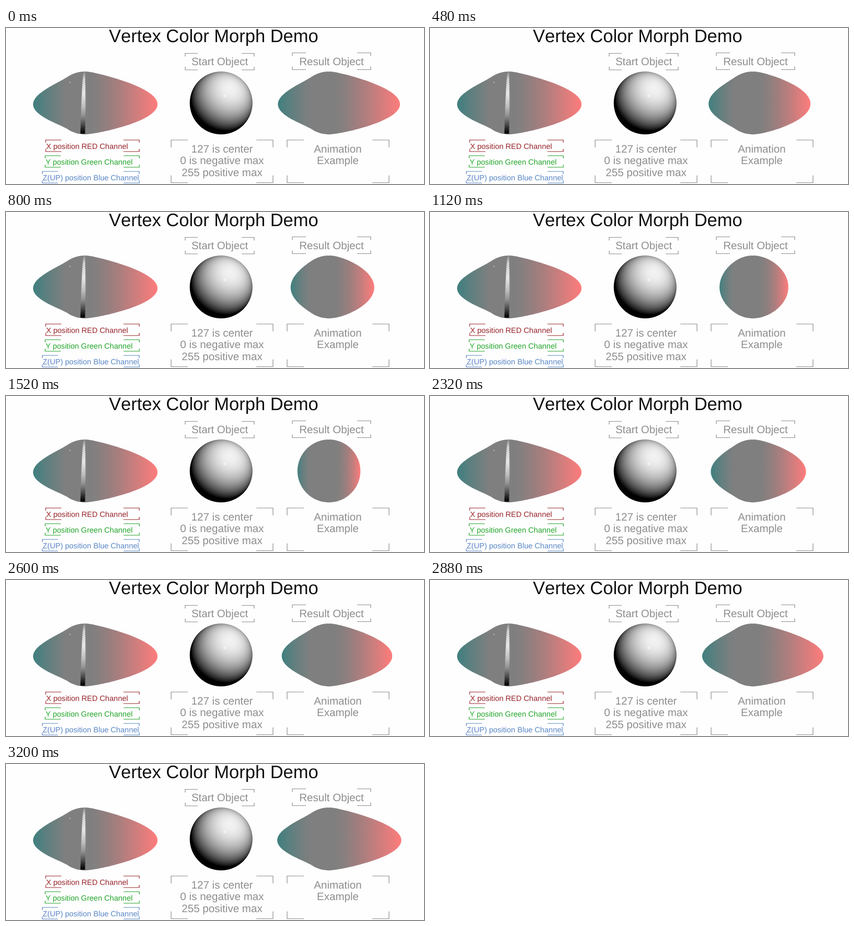
These frames come from a looping animation (800 by 298 pixels, 3.24 s). An HTML page with a canvas:

```html
<!DOCTYPE html>
<html lang="en">
<head>
<meta charset="utf-8">
<title>Vertex Color Morph Demo</title>
<style>
  html, body { margin: 0; width: 100%; height: 100%; overflow: hidden; background: #fefefe; }
  canvas { position: absolute; left: 350px; top: 82px; }
  svg { position: absolute; left: 0; top: 0; }
  text {
    font-family: "Liberation Sans", Arial, sans-serif;
    font-kerning: none;
    text-rendering: geometricPrecision;
  }
</style>
</head>
<body>
<canvas id="ball" width="124" height="124"></canvas>
<svg id="stage" width="800" height="298" viewBox="0 0 800 298">
  <defs>
    <linearGradient id="stripShade" gradientUnits="userSpaceOnUse" x1="0" y1="83" x2="0" y2="203">
      <stop offset="0" stop-color="#8c8c8c"/>
      <stop offset=".12" stop-color="#cfcfcf"/>
      <stop offset=".35" stop-color="#e6e6e6"/>
      <stop offset=".55" stop-color="#c0c0c0"/>
      <stop offset=".7" stop-color="#929292"/>
      <stop offset=".85" stop-color="#484848"/>
      <stop offset=".96" stop-color="#0a0a0a"/>
    </linearGradient>
  </defs>
</svg>
<script>
const NS = "http://www.w3.org/2000/svg";
const stage = document.getElementById("stage");
const RADIUS = 60, CENTER_Y = 143.2;
const LOOP = 3240, STEP = 40, SWING = 3333;
const GREY = "#8e8e8e";

function add(parent, tag, attrs, content) {
  const el = document.createElementNS(NS, tag);
  for (const key in attrs) el.setAttribute(key, attrs[key]);
  if (content) el.textContent = content;
  parent.appendChild(el);
  return el;
}

function label(content, x, y, size, fill, anchor = "middle") {
  add(stage, "text", { x, y, fill, "font-size": size, "text-anchor": anchor }, content);
}

function brackets(x0, y0, x1, y1, armX, armY, stroke) {
  const corner = (x, y, sx, sy) => `M${x + sx * armX} ${y}H${x}V${y + sy * armY}`;
  const d = corner(x0, y0, 1, 1) + corner(x1, y0, -1, 1) +
            corner(x0, y1, 1, -1) + corner(x1, y1, -1, -1);
  add(stage, "path", { d, stroke, fill: "none", "stroke-width": 1.2 });
}

// Red channel offset painted on the ball: -0.5 (left) to 1 (right)
function paint(x) {
  if (x > 8) return ((x - 8) / 52) ** 2;
  if (x < -33) return -0.495 * ((-33 - x) / 27) ** 2;
  return 0;
}

const shiftX = (x, amount) => x + 79 * amount * paint(x);

function outline(cx, amount) {
  const points = [];
  for (let i = 0; i < 180; i++) {
    const a = i * Math.PI / 90;
    const x = RADIUS * Math.cos(a), p = paint(x);
    const sag = 2.5 * amount * (p < 0 ? -2 * p : p) ** 0.7;
    const y = CENTER_Y + RADIUS * Math.sin(a) + sag;
    points.push((cx + shiftX(x, amount)).toFixed(2) + " " + y.toFixed(2));
  }
  return "M" + points.join("L") + "Z";
}

function makeMorph(id, cx) {
  const gradient = add(stage.querySelector("defs"), "linearGradient", {
    id, gradientUnits: "userSpaceOnUse", x1: cx - 100, x2: cx + 140, y1: 0, y2: 0
  });
  const samples = [];
  for (let x = -RADIUS; x <= RADIUS; x += 4) {
    const p = paint(x), red = Math.round(127 + 128 * p);
    const side = Math.round(127 - 3 * Math.max(p, 0));
    const stop = add(gradient, "stop", { "stop-color": `rgb(${red},${side},${side})` });
    samples.push({ x, stop });
  }
  const shape = add(stage, "path", { fill: `url(#${id})` });
  return amount => {
    shape.setAttribute("d", outline(cx, amount));
    for (const { x, stop } of samples)
      stop.setAttribute("offset", (shiftX(x, amount) + 100) / 240);
  };
}

// Unpainted seam with ragged edges
function drawSeam() {
  const left = [], right = [];
  for (let y = 84; y <= 202; y += 2) {
    const k = (y - 84) / 118, tooth = y % 4 ? 0.6 : -0.6;
    left.push(`${149.3 - 7 * Math.sqrt(k) + tooth} ${y}`);
    right.unshift(`${151.3 + 0.9 * Math.sin(k * Math.PI) + tooth} ${y}`);
  }
  add(stage, "path", { d: "M" + left.concat(right).join("L") + "Z", fill: "url(#stripShade)" });
  add(stage, "path", { d: "M121 104.5l2.5-2 1 1-2 1.5z", fill: "#c4c4c4" });
}

function drawBall() {
  const ctx = document.getElementById("ball").getContext("2d");
  const size = 124, image = ctx.createImageData(size, size);
  const light = [0.3, -0.46, 0.836], half = [0.113, -0.222, 0.968];
  const dot = (a, b) => a[0] * b[0] + a[1] * b[1] + a[2] * b[2];
  for (let j = 0; j < size; j++) for (let i = 0; i < size; i++) {
    const x = (i + 0.5 - 61.7) / RADIUS, y = (j + 0.5 - 61.2) / RADIUS;
    const r = Math.hypot(x, y);
    const normal = [x, y, Math.sqrt(Math.max(0, 1 - r * r))];
    const shade = 242 * Math.max(0, dot(normal, light)) +
                  35 * Math.max(0, dot(normal, half)) ** 1200;
    const at = 4 * (j * size + i);
    image.data.fill(Math.min(255, shade), at, at + 3);
    image.data[at + 3] = 255 * Math.min(1, Math.max(0, (1 - r) * RADIUS + 0.5));
  }
  ctx.putImageData(image, 0, 0);
}

label("Vertex Color Morph Demo", 197, 27.3, 34.5, "#111", "start");

label("Start Object", 409, 71.3, 20.5, GREY);
brackets(343, 48.5, 475, 80, 24, 6, GREY);
label("Result Object", 623, 70.8, 20.6, GREY);
brackets(548, 47.5, 698, 79.5, 26, 6, GREY);

label("127 is center", 413.5, 237.5, 20.6, GREY);
label("0 is negative max", 413.5, 260, 20.6, GREY);
label("255 positive max", 413.5, 282.7, 20.6, GREY);
brackets(316, 214, 511, 295.5, 32, 14, GREY);
label("Animation", 635, 237.5, 20.6, GREY);
label("Example", 635, 260, 20.6, GREY);
brackets(538, 214, 733, 295.5, 32, 14, GREY);

[
  ["X position RED Channel", "#98242a", 76],
  ["Y position Green Channel", "#22a52a", 75],
  ["Z(UP) position Blue Channel", "#5b87c8", 69.5]
].forEach(([content, color, x], row) => {
  const y = 214 + 30 * row;
  label(content, x + 0.7, y + 16.5, 14.55, color, "start");
  brackets(x, y, 255, y + 22, 30, 5, color);
});

drawBall();
makeMorph("paintedFill", 151)(1);
drawSeam();
const updateResult = makeMorph("resultFill", 618);

function render(time) {
  const t = Math.floor(time % LOOP / STEP) * STEP;
  updateResult((1 + Math.cos(0.392 + 2 * Math.PI * t / SWING)) / 2);
}

const start = performance.now();
function frame() {
  render(performance.now() - start);
  requestAnimationFrame(frame);
}
render(0);
requestAnimationFrame(frame);
</script>
</body>
</html>
```
